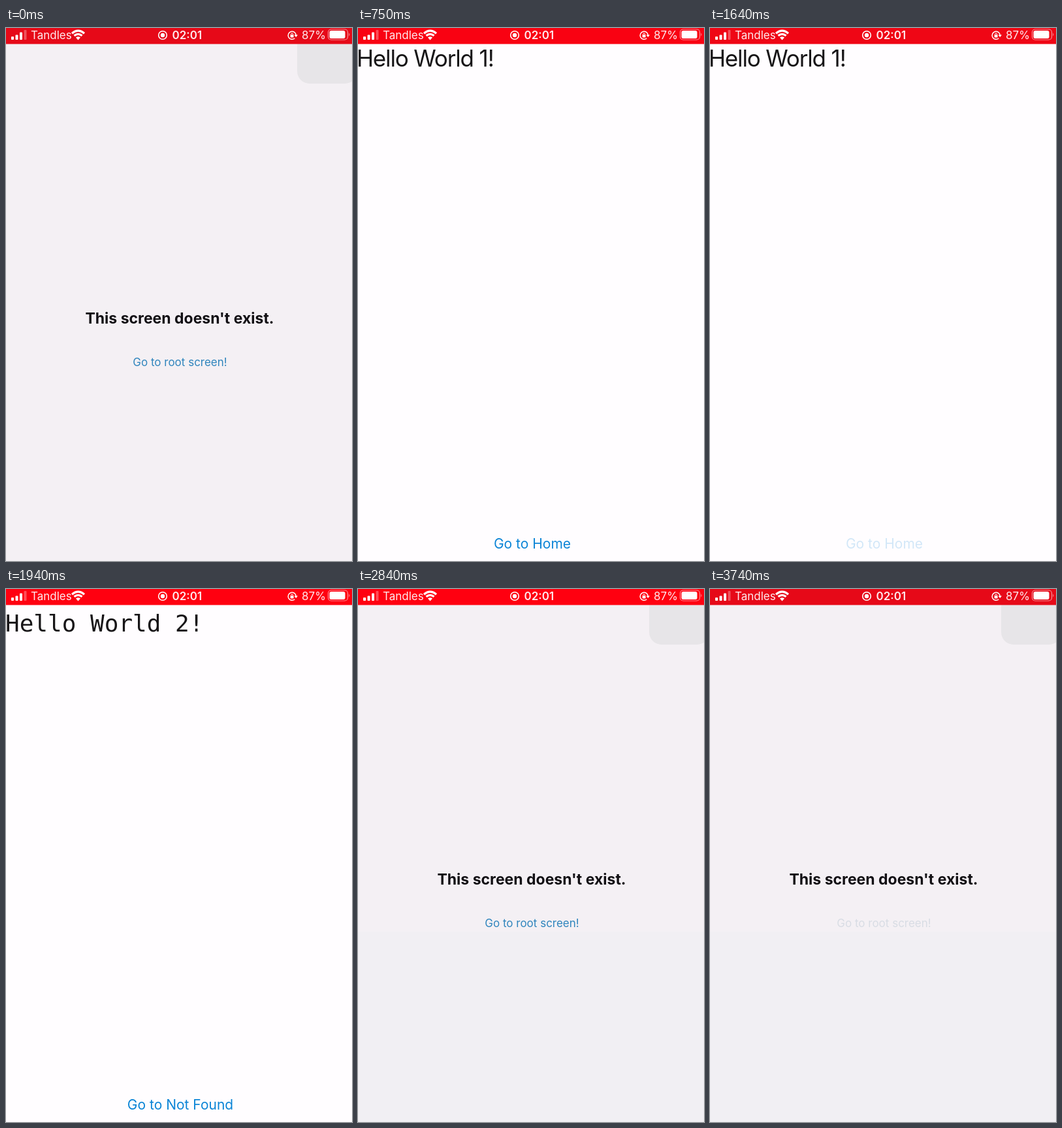
An HTML page for the animation above (3840 ms loop, 530 by 815 pixels).

```html
<!DOCTYPE html>
<html lang="en">
<head>
<meta charset="utf-8">
<style>
html, body { margin: 0; width: 100%; height: 100%; overflow: hidden; background: #fffdff; }
svg { display: block; width: 530px; height: 815px; font-family: Inter, sans-serif; }
.mono { font-family: "DejaVu Sans Mono", monospace; }
.mid { text-anchor: middle; }
.line { fill: none; stroke: #fff; }
</style>
</head>
<body>
<svg viewBox="0 0 530 815">
  <g id="one">
    <rect width="530" height="815" fill="#fffdff"/>
    <text x="-2" y="59" font-size="35" letter-spacing="-1.15" fill="#171517">Hello World 1!</text>
    <text id="homeLink" class="mid" x="267" y="795.5" font-size="21" fill="#0a84d6">Go to Home</text>
  </g>
  <g id="two">
    <rect width="530" height="815" fill="#fffdff"/>
    <text class="mono" x="-1" y="65" font-size="36" fill="#171517">Hello World 2!</text>
    <text id="lostLink" class="mid" x="267" y="795.5" font-size="21" fill="#0a84d6">Go to Not Found</text>
  </g>
  <g id="lost">
    <rect width="530" height="815" fill="#f4f0f4"/>
    <rect id="lower" y="524" width="530" height="291" fill="#f1eff3"/>
    <rect x="446" y="8" width="92" height="77" rx="19" fill="#e7e5e8"/>
    <text class="mid" x="266" y="451.5" font-size="23" font-weight="700" fill="#121014">This screen doesn't exist.</text>
    <text id="rootLink" class="mid" x="266.5" y="517" font-size="17" fill="#3085bd">Go to root screen!</text>
  </g>

  <rect id="bar" width="530" height="24.5"/>
  <g fill="#fff" font-size="17">
    <rect x="8" y="13" width="4" height="5" rx="1"/>
    <rect x="14.5" y="10.5" width="4" height="7.5" rx="1"/>
    <rect x="21" y="6.5" width="4" height="11.5" rx="1"/>
    <rect x="27.5" y="3" width="4" height="15" rx="1" opacity=".3"/>
    <text x="38" y="17" fill="#ffe9ec">Tandles</text>
    <g class="line" stroke-width="3.2">
      <path d="M101 8.2Q110.500 .2 120 8.200"/>
      <path d="M104.500 11.800Q110.500 6.800 116.500 11.800"/>
    </g>
    <path d="M107 14.500Q110.500 11.800 114 14.500L110.500 18.500Z"/>
    <circle class="line" cx="240" cy="11" r="6.3" stroke-width="1.6"/>
    <circle cx="240" cy="11" r="3.2"/>
    <text x="254.500" y="17" font-weight="600" fill="#ffe9ec">02:01</text>
    <path class="line" d="M442.300 15.700A6 6 0 1 1 444.200 11" stroke-width="1.5"/>
    <path d="M441.500 10.500H447L444.200 14Z"/>
    <rect x="435.600" y="10.200" width="5" height="4.200" rx=".6"/>
    <path class="line" d="M436.700 10.500V9.300a1.400 1.400 0 0 1 2.800 0V10.500" stroke-width="1"/>
    <text x="453" y="17" fill="#ffe9ec">87%</text>
    <rect class="line" x="493.500" y="2" width="30" height="16" rx="4.500" stroke-width="1.200" opacity=".55"/>
    <rect x="495.500" y="4" width="24" height="12" rx="2.800"/>
    <path d="M525.300 7.500Q527.500 10 525.300 12.500Z" opacity=".6"/>
  </g>
</svg>
<script>
const LOOP = 3840, PULSE = 2090, DARK_AT = 1200;
const $ = id => document.getElementById(id);
const show = (id, on) => $(id).setAttribute("visibility", on ? "visible" : "hidden");
const press = (id, on, color, faded) => $(id).setAttribute("fill", on ? faded : color);
const mix = (a, b, k) => Math.round(a + (b - a) * k);

// Recording bar glows and dims, resting while the last screen is still.
function glow(t) {
  if (t < 450 || (t >= 3290 && t < 3740)) return 0;
  const wave = (1 - Math.cos((t - DARK_AT) / PULSE * 2 * Math.PI)) / 2;
  return Math.min(1, wave * 1.9);
}

function draw(t) {
  const screen = t < 450 || t >= 2840 ? "lost" : t < 1790 ? "one" : "two";
  for (const id of ["one", "two", "lost"]) show(id, id === screen);
  show("lower", t >= 2840);
  press("homeLink", t >= 1640, "#0a84d6", "#d2e7f8");
  press("lostLink", t >= 2690, "#0a84d6", "#d2e7f8");
  press("rootLink", t >= 3740, "#3085bd", "#d8dce4");
  const k = glow(t < 450 ? t : 450 + Math.floor((t - 450) / 149.500) * 149.500);
  $("bar").setAttribute("fill", `rgb(${mix(230, 255, k)},${mix(9, 0, k)},${mix(24, 16, k)})`);
}

function tick(now) {
  draw(now % LOOP);
  requestAnimationFrame(tick);
}
draw(0);
requestAnimationFrame(tick);
</script>
</body>
</html>
```
